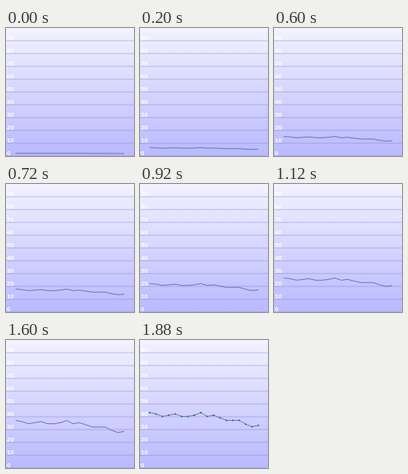
These frames come from a looping animation (160x160 px, 2400 ms). An HTML page with a canvas:

```html
<!DOCTYPE html>
<html lang="en">
<head>
<meta charset="utf-8">
<title>Rising line chart</title>
<style>
html, body { margin: 0; width: 100%; height: 100%; overflow: hidden; background: #d6d6ff; }
canvas { display: block; width: 160px; height: 160px; }
</style>
</head>
<body>
<canvas id="chart"></canvas>
<script>
const SIZE = 160, LOOP = 2400, STEP = 40, STEPS = 48;
const BASE = 158, UNIT = 1.6, LEFT = 12, GAP = 8;
const values = [42, 41, 39, 40, 41, 39, 39, 40, 42, 39, 40, 38, 36, 36, 36, 33, 31, 32];

const canvas = document.getElementById('chart');
const ctx = canvas.getContext('2d');
const ratio = window.devicePixelRatio || 1;
canvas.width = canvas.height = Math.round(SIZE * ratio);
ctx.scale(ratio, ratio);

const sky = ctx.createLinearGradient(0, 0, 0, SIZE);
sky.addColorStop(0, '#f2f2ff');
sky.addColorStop(1, '#b9b9ff');

function drawGrid() {
  ctx.fillStyle = sky;
  ctx.fillRect(0, 0, SIZE, SIZE);
  ctx.font = 'bold 8px "Liberation Sans", Arial, sans-serif';
  for (let i = 0; i < 10; i++) {
    const y = SIZE - i * 16;
    ctx.fillStyle = 'rgba(130, 120, 210, 0.22)';
    ctx.fillRect(0, y - 1, SIZE, 2);
    ctx.fillStyle = '#fff';
    ctx.fillText(String(i * 10), 1, y - 1);
  }
}

function drawLine(grow) {
  const points = values.map((v, i) => [LEFT + i * GAP, BASE - v * UNIT * grow]);
  ctx.beginPath();
  points.forEach(([x, y]) => ctx.lineTo(x, y));
  ctx.strokeStyle = '#657ca8';
  ctx.lineWidth = 1;
  ctx.lineJoin = 'round';
  ctx.stroke();
  if (grow < 1) return;
  ctx.fillStyle = '#305c78';
  for (const [x, y] of points) {
    ctx.beginPath();
    ctx.arc(x, y, 1, 0, Math.PI * 2);
    ctx.fill();
  }
}

function draw(now) {
  const step = Math.floor((now % LOOP) / STEP) + 1;
  drawGrid();
  drawLine(Math.min(step / STEPS, 1));
}

const start = performance.now();
function tick() {
  draw(performance.now() - start);
  requestAnimationFrame(tick);
}
tick();
</script>
</body>
</html>
```
